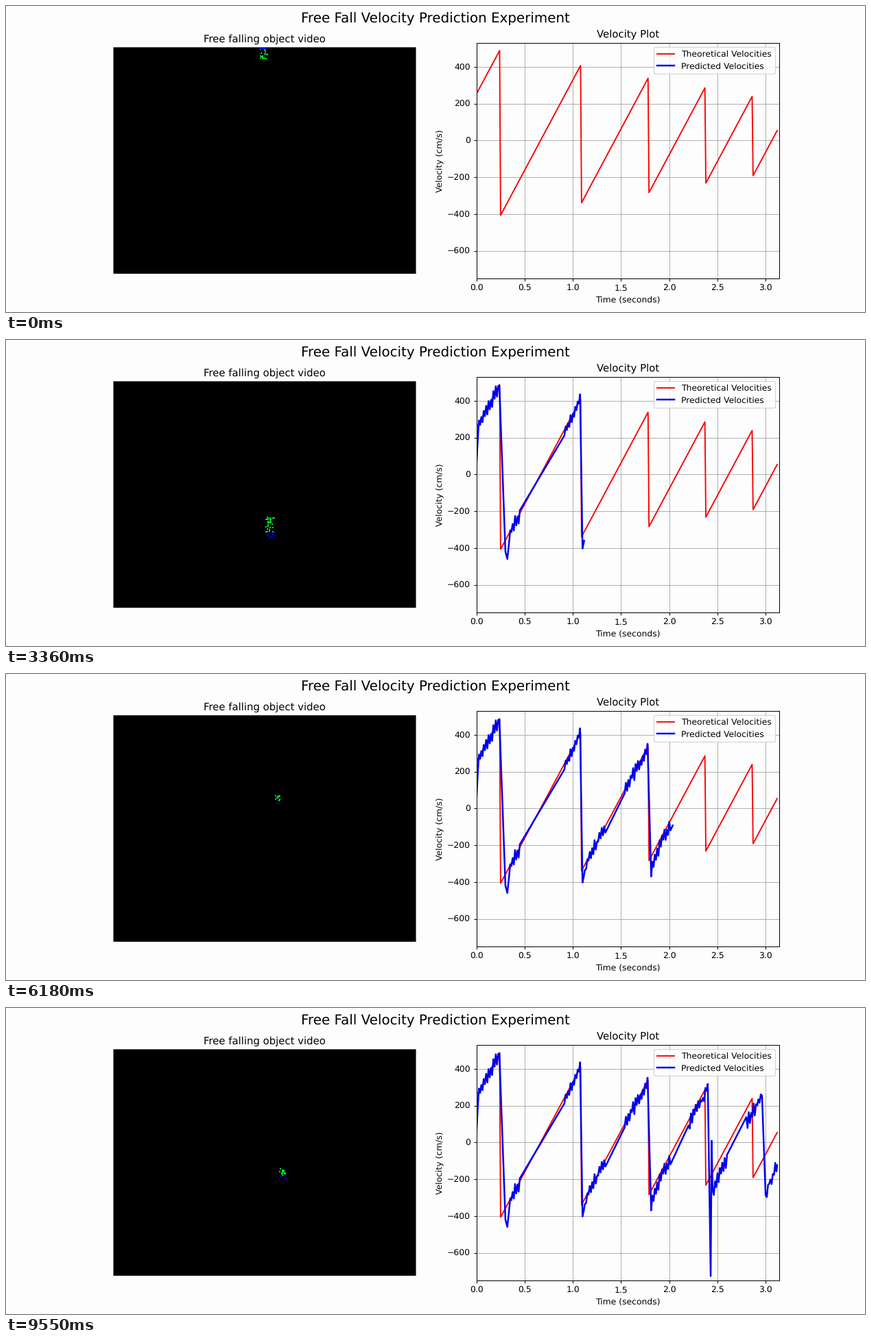
Animation, 1252 px wide and 447 px high, one loop 9640 ms. Source, as a matplotlib script:

```python
import numpy as np
import matplotlib.pyplot as plt
from matplotlib.animation import FuncAnimation

WIDTH, HEIGHT = 1252, 447
DPI = HEIGHT / 5
LOOP_MS, STEP_MS = 9640, 40
LAST_STEP, END_TIME = 95, 3.12
GRAVITY, PX_PER_CM = 981, 2.6
PAPER = "#fdfdfd"

plt.rcParams.update({"font.family": "DejaVu Sans", "text.hinting": "none"})

# Ideal impacts follow a geometric series; the tracked ball bounces a little longer.
ideal_impacts = .245 + np.r_[-.84 / .835, 0, np.cumsum(.84 * .835 ** np.arange(5))]
real_impacts = np.array([-.74, .255, 1.085, 1.795, 2.42, 2.98, 3.53])

# Spells without usable readings, and the few wild readings.
BLIND = [(.255, .33), (.46, .90), (2.415, 2.445)]
OUTLIERS = [(.30, -420), (.32, -460), (2.43, -727), (2.44, 9)]


def arc_at(t, impacts):
    """Start and apex time of the free flight that contains t."""
    arc = np.searchsorted(impacts, t, side="right") - 1
    return impacts[arc], (impacts[arc] + impacts[arc + 1]) / 2


def velocity(t, impacts):
    return GRAVITY * (t - arc_at(t, impacts)[1])


def measured_velocity():
    """Jagged readings: overshoot at impacts, none around each apex."""
    rng = np.random.default_rng(4)
    t = np.arange(0, END_TIME + .01, .0125)
    v = velocity(t, real_impacts)
    gap = np.abs(t[:, None] - real_impacts).min(axis=1)
    teeth = (-1) ** np.arange(t.size) * rng.uniform(0, 42, t.size)
    overshoot = np.where(v > 0, .1, .35) * np.exp(-gap / .03)
    v = v * (1 + overshoot) * (1 - .92 * np.exp(-t / .008))
    v += teeth * (1 - np.exp(-gap / .02))
    keep = (np.abs(t - arc_at(t, real_impacts)[1]) > .09) & (gap > .008)
    for start, stop in BLIND:
        keep &= (t < start) | (t > stop)
    readings = np.vstack([np.c_[t, v][keep], OUTLIERS])
    return readings[readings[:, 0].argsort()].T


theory_times = np.arange(0, END_TIME + .005, .01)
times, speeds = measured_velocity()

fig, (video, plot) = plt.subplots(1, 2, figsize=(WIDTH / DPI + 1e-9, 5 + 1e-9),
                                  dpi=DPI, facecolor=PAPER)
fig.suptitle("Free Fall Velocity Prediction Experiment", fontsize=16)

# The video axes use stage pixels as data coordinates.
video.set(title="Free falling object video", facecolor="black", aspect="equal",
          xlim=(156.5, 597.5), ylim=(391.1, 60.3), xticks=[], yticks=[])
video.spines[:].set_visible(False)
video.patch.set_snap(False)
events = video.scatter([], [], s=2.6, marker="s", linewidths=0)

plot.set_facecolor(PAPER)
plot.plot(theory_times, velocity(theory_times, ideal_impacts),
          color="#f80000", lw=1.5, label="Theoretical Velocities")
trace, = plot.plot([], [], color="#0000ec", lw=2, label="Predicted Velocities")
plot.set(title="Velocity Plot", xlabel="Time (seconds)", ylabel="Velocity (cm/s)",
         xlim=(0, 3.14), ylim=(-750, 531))
plot.grid(True)
plot.legend(loc="upper right")


def step_at(ms):
    """Ten steps of 90 ms, then a short hold, in every second."""
    second, within = divmod(ms + 450, 1000)
    return min(10 * second + min(within // 90, 9) - 5, LAST_STEP)


def ball(t):
    """Position in pixels, with a slight sideways drift."""
    start, apex = arc_at(t, real_impacts)
    height = GRAVITY * ((apex - start) ** 2 - (t - apex) ** 2) / 2
    x = np.interp(t, [0, .36, .82, 1.48, 3.12], [375.5, 383.5, 378, 393, 404])
    floor = np.interp(t, [0, 2, 2.8, 3.12], [306, 300, 328, 316])
    return x, floor - PX_PER_CM * height


def event_cloud(step, t):
    x, y = ball(t)
    if BLIND[1][0] < t < BLIND[1][1]:
        return [(x, y)], ["#00c020"]
    rng = np.random.default_rng(step)
    speed = velocity(t, real_impacts)
    pace, way = abs(speed), np.sign(speed)
    tall, wide = 7 + .08 * pace, min(6 + .025 * pace, 11)
    n_green, n_blue = int(8 + .07 * pace), int(1 + .03 * pace)
    # Green marks the leading edge, blue the trailing one.
    along = np.r_[rng.uniform(-.15, .5, n_green), rng.uniform(-.5, -.15, n_blue)]
    across = rng.uniform(-.5, .5, n_green + n_blue)
    spots = np.c_[x + across * wide, y + way * along * tall]
    spots = np.round(spots / 1.4) * 1.4
    spots[:, 1] = np.clip(spots[:, 1], 62, 390)
    return spots, ["#00e020"] * n_green + ["#0000d0"] * n_blue


def update(i):
    step = step_at(i * STEP_MS + 30)
    t = step * END_TIME / LAST_STEP
    seen = times < t
    trace.set_data(np.append(times[seen], t),
                   np.append(speeds[seen], np.interp(t, times, speeds)))
    spots, colors = event_cloud(step, t)
    events.set_offsets(spots)
    events.set_facecolor(colors)
    return trace, events


anim = FuncAnimation(fig, update, frames=LOOP_MS // STEP_MS, interval=STEP_MS,
                     repeat=True, repeat_delay=0)
plt.show()
```
